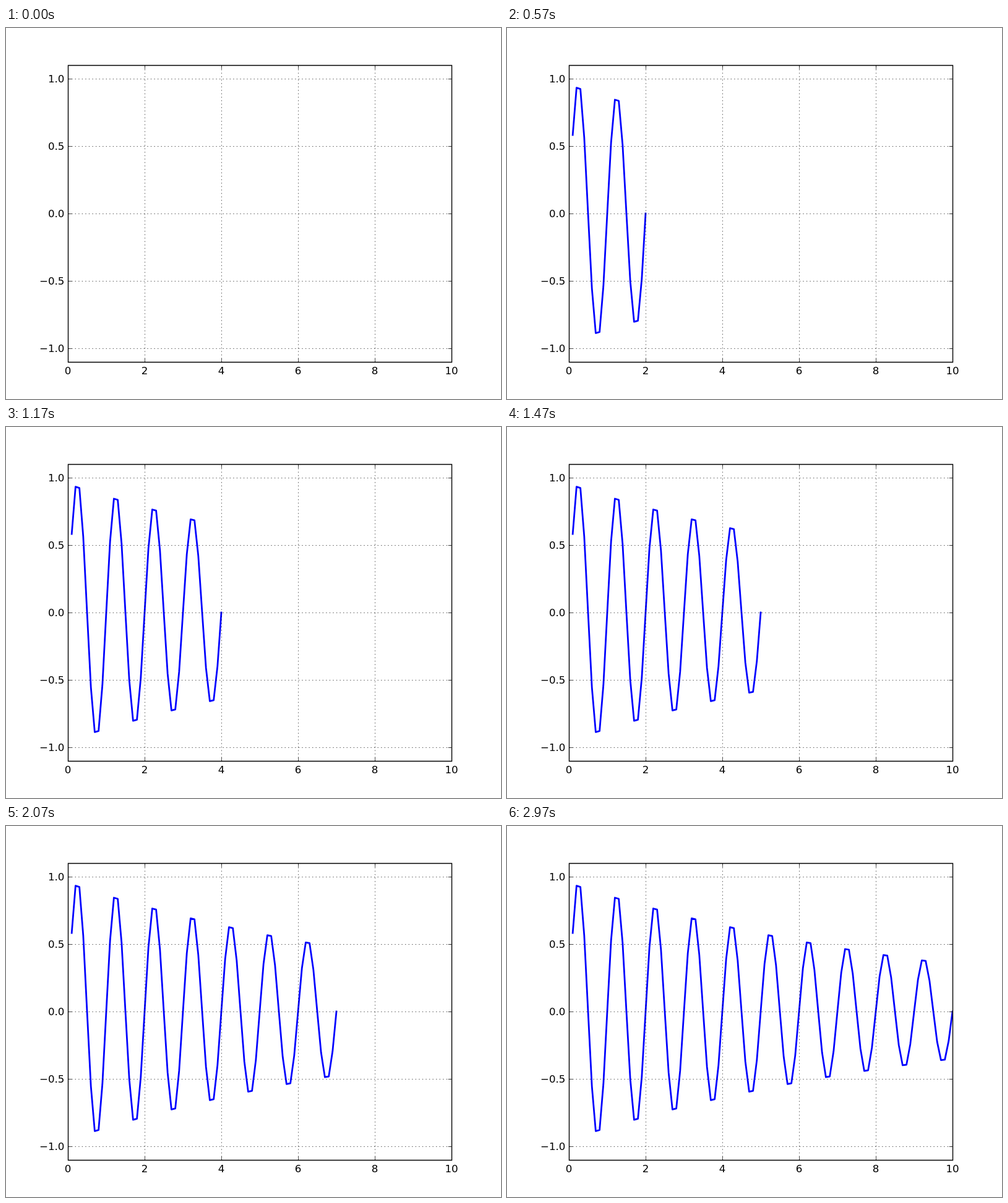
An HTML page for the animation above (3 s loop, 800 by 600 pixels).

```html
<!DOCTYPE html>
<html>
<head>
<meta charset="utf-8">
<style>
  html, body { margin: 0; width: 100%; height: 100%; overflow: hidden; background: #fff; }
  svg { display: block; }
  text { font: 16.667px "DejaVu Sans", sans-serif; }
  path { fill: none; stroke: #000; }
  .thin { stroke-width: .694; }
  .grid { stroke-dasharray: 1.389 4.167; }
  .frame { stroke-width: 1.389; }
  #curve { stroke: #00f; stroke-width: 2.778; stroke-linecap: square; stroke-linejoin: round; }
</style>
</head>
<body>
<svg width="800" height="600">
  <clipPath id="plot"><rect x="100" y="60" width="620" height="480"/></clipPath>
  <g clip-path="url(#plot)"><path id="curve"/></g>
  <g id="axes"></g>
</svg>
<script>
const STEP = 30, COUNT = 100;
const toX = t => 100 + 62 * t;
const toY = v => 300 - v * 480 / 2.2;
const decay = t => Math.sin(2 * Math.PI * t) * Math.exp(-t / 10);

const path = (d, cls) => `<path class="${cls}" d="${d}"/>`;
const label = (x, y, anchor, s) => `<text x="${x}" y="${y}" text-anchor="${anchor}">${s}</text>`;

let out = '';
for (let t = 0; t <= 10; t += 2) {
  const x = toX(t) + .5;
  out += path(`M${x} 540.5V60.5`, 'thin grid')
    + path(`M${x} 540.5V534.5M${x} 60.5V66.5`, 'thin')
    + label(toX(t), 560, 'middle', t);
}
for (let v = -1; v <= 1; v += .5) {
  const y = Math.round(toY(v));
  out += path(`M100.5 ${y + .5}H720.5`, 'thin grid')
    + path(`M100.5 ${y + .5}H106.5M720.5 ${y + .5}H714.5`, 'thin')
    + label(94.4, y + 6, 'end', v.toFixed(1).replace('-', '\u2212'));
}
document.getElementById('axes').innerHTML = out + path('M100.5 60.5H720.5V540.5H100.5Z', 'frame');

const points = Array.from({ length: COUNT }, (_, i) => {
  const t = (i + 1) / 10;
  return toX(t).toFixed(2) + ' ' + toY(decay(t)).toFixed(2);
});
const curve = document.getElementById('curve');

// One more sample joins the curve at every step; a single sample draws nothing.
function draw() {
  const n = Math.floor(performance.now() / STEP) % COUNT;
  curve.setAttribute('d', n ? 'M' + points.slice(0, n + 1).join('L') : '');
  requestAnimationFrame(draw);
}
draw();
</script>
</body>
</html>
```
